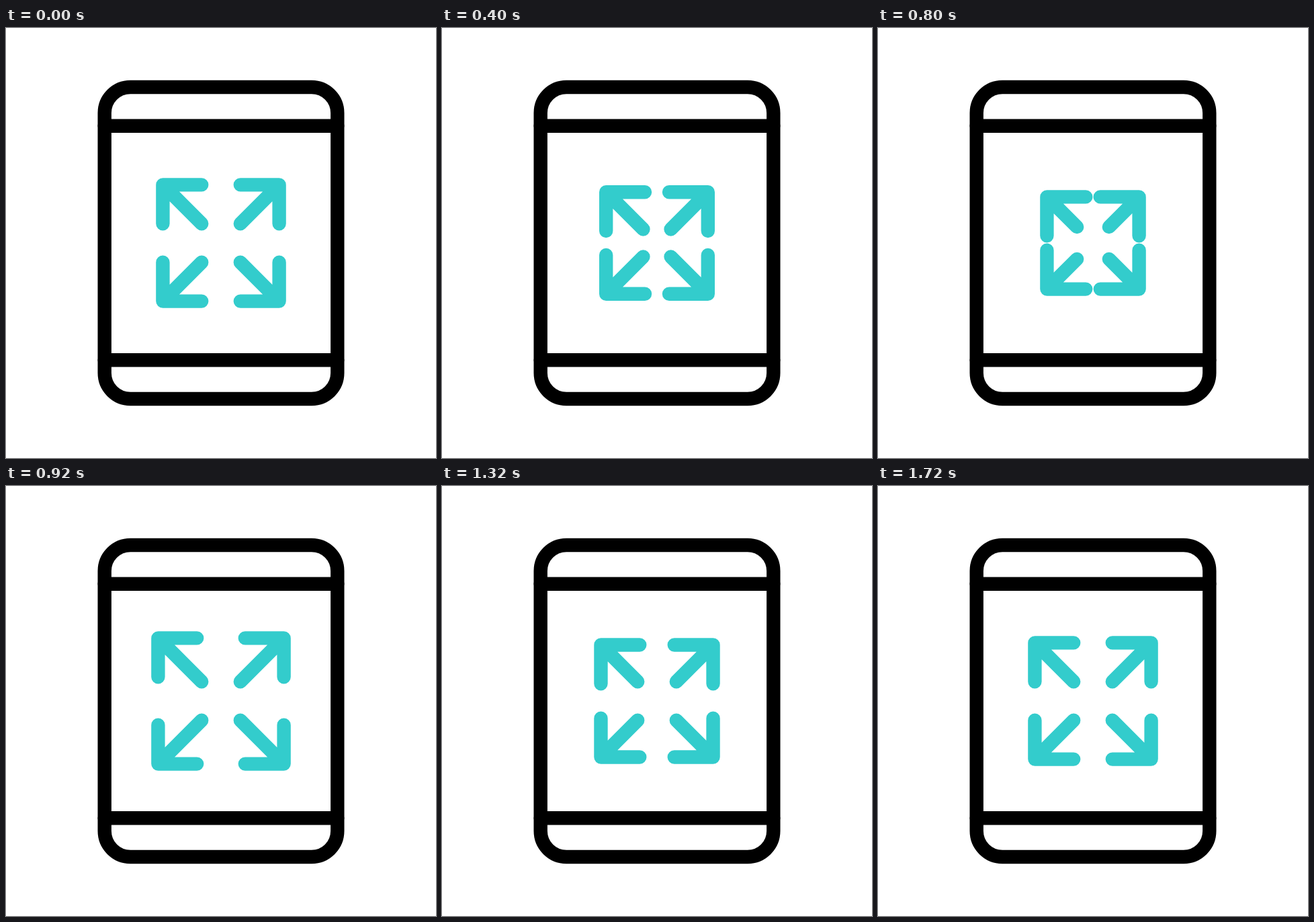
Animation of 640 by 640 pixels, one loop 2400 ms. Source, as an HTML page:

```html
<!DOCTYPE html>
<html lang="en">
<head>
<meta charset="utf-8">
<title>Expand screen</title>
<style>
  html, body { margin: 0; height: 100%; overflow: hidden; background: #fff; }
  svg { display: block; width: 100vw; height: 100vh; }
</style>
</head>
<body>
<svg viewBox="0 0 640 640" fill="none" stroke="#000" stroke-width="20.4" stroke-linecap="round" stroke-linejoin="round">
  <rect x="146.7" y="88" width="346.6" height="464" rx="38.5"/>
  <path d="M146.7 145.7H493.3M146.7 494.3H493.3"/>
  <defs><path id="arrow"/></defs>
  <g stroke="#3cc" transform="translate(320 320)">
    <use href="#arrow"/>
    <use href="#arrow" transform="scale(-1 1)"/>
    <use href="#arrow" transform="scale(1 -1)"/>
    <use href="#arrow" transform="scale(-1 -1)"/>
  </g>
</svg>
<script>
  const LOOP = 2400, ARM = 57.8;
  const arrow = document.getElementById('arrow');

  // Keys: [time, distance from the centre, steepness of the ease into it]
  const tipKeys = [[200, 86.6], [680, 42.9, 3.4], [920, 93.6, 1.6], [1187, 83, 1.6], [1720, 86.6, 1.6]];
  const tailKeys = [[200, 28.8], [520, 17, 1.6], [680, 17, 1.6], [900, 28.8, 1.6]];

  const ease = (x, n) => x ** n / (x ** n + (1 - x) ** n);

  function valueAt(keys, t) {
    if (t <= keys[0][0]) return keys[0][1];
    const i = keys.findIndex(key => key[0] > t);
    if (i < 0) return keys[keys.length - 1][1];
    const [t0, v0] = keys[i - 1], [t1, v1, n] = keys[i];
    return v0 + (v1 - v0) * ease((t - t0) / (t1 - t0), n);
  }

  function draw(now) {
    const t = now % LOOP;
    const tip = -valueAt(tipKeys, t), tail = -valueAt(tailKeys, t), end = tip + ARM;
    arrow.setAttribute('d', `M${end} ${tip}H${tip}V${end}M${tip} ${tip}L${tail} ${tail}`);
    requestAnimationFrame(() => draw(performance.now() - start));
  }

  const start = performance.now();
  draw(0);
</script>
</body>
</html>
```
